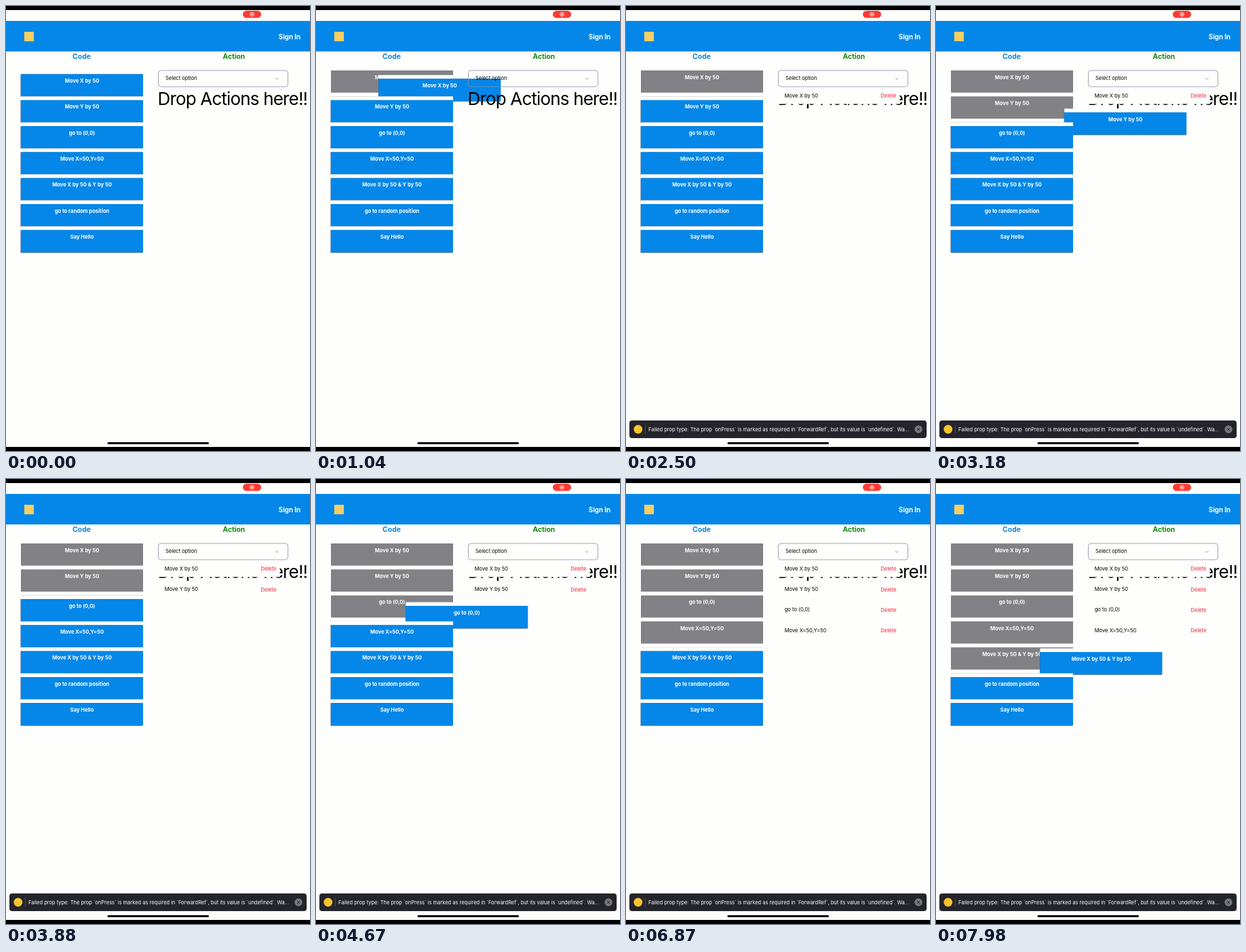
Recreate the animation shown at these times as an HTML page. Size 448x656 px, loop 8 s.

```html
<!DOCTYPE html>
<html lang="en">
<head>
<meta charset="utf-8">
<title>Drag and drop actions</title>
<style>
  html, body { margin: 0; width: 100%; height: 100%; overflow: hidden; background: #fefefd; }
  svg { display: block; width: 448px; height: 656px; }
  text { font-family: Inter, Roboto, sans-serif; font-size: 7.6px; font-optical-sizing: none; }
  .bold { font-weight: 700; }
  .mid { text-anchor: middle; }
  .white { fill: #fff; }
</style>
</head>
<body>
<svg viewBox="0 0 448 656">
  <rect width="448" height="656" fill="#fefefd"/>
  <g id="blocks"></g>

  <rect width="448" height="6"/>
  <rect y="650" width="448" height="6"/>
  <rect x="149.5" y="643" width="149.5" height="3" rx="1.5"/>
  <rect x="349" y="7" width="27" height="10.5" rx="5.2" fill="#fb3a34"/>
  <circle cx="362.5" cy="12.2" r="2.9" fill="none" stroke="#fff" stroke-width=".8"/>
  <circle cx="362.5" cy="12.2" r="1.3" fill="#fff"/>

  <rect y="22" width="448" height="45" fill="#0487e8"/>
  <rect x="27" y="38" width="14" height="14" fill="#f8cf62"/>
  <text class="bold white" x="434" y="48.5" text-anchor="end" style="font-size:9.7px">Sign In</text>
  <text class="bold mid" x="111.5" y="77.7" fill="#0a84dc" style="font-size:10.4px">Code</text>
  <text class="bold mid" x="335.8" y="77.7" fill="#0c8a0c" style="font-size:10.2px">Action</text>

  <rect x="224.5" y="95" width="191" height="24" rx="4" fill="none" stroke="#8c8ca4" stroke-width=".8"/>
  <text x="235" y="109.2" style="font-size:7.5px">Select option</text>
  <path d="M397 106l2.3 2.3 2.3-2.3" fill="none" stroke="#8a8a92" stroke-width=".8"/>
  <text x="223.5" y="146" style="font-size:26px;letter-spacing:-.032em">Drop Actions here!!</text>
  <g id="rows"></g>

  <g id="warning">
    <rect x="5" y="611" width="438" height="26" rx="4" fill="#24242b"/>
    <circle cx="17.8" cy="624" r="6.4" fill="#f8c52c"/>
    <path d="M28.5 617.5v13" stroke="#55555c" stroke-width=".8"/>
    <text class="white" x="33" y="626.7" style="font-size:7.5px">Failed prop type: The prop `onPress` is marked as required in `ForwardRef`, but its value is `undefined`. Wa...</text>
    <circle cx="431" cy="624" r="5.7" fill="#77777c"/>
    <path d="M429 622l4 4m0-4l-4 4" stroke="#222228" stroke-width="1"/>
  </g>
</svg>
<script>
const LOOP = 8000, PITCH = 38.3, WIDTH = 180, HEIGHT = 32.7, GAP = 5.5;

const labels = ['Move X by 50', 'Move Y by 50', 'go to (0,0)', 'Move X=50,Y=50',
  'Move X by 50 & Y by 50', 'go to random position', 'Say Hello'];

// Per dragged block: [time, dx, dy]; the block is dropped at the last time.
const drags = [
  [[920, 0, 0], [1040, 70, 6.7], [1250, 150, 26], [1640, 218, 43.7], [1850, 220, 45]],
  [[2820, 0, 0], [3180, 167, 18], [3420, 212, 25], [3650, 218, 28]],
  [[4480, 0, 0], [4670, 110, 10], [5000, 205, 6], [5200, 210, 4]],
  [[5930, 0, 0], [6010, 25, 1.5], [6400, 200, 0], [6700, 212, -5]],
  [[7780, 0, 0], [7980, 131, 1.5], [8100, 180, 3]]
];

const byId = id => document.getElementById(id);
const dropTime = path => path[path.length - 1][0];
const escape = text => text.replace('&', '&amp;');
const show = (element, visible) => element.style.display = visible ? '' : 'none';

function box(fill, label) {
  return `<rect width="${WIDTH}" height="${HEIGHT}" fill="${fill}"/>
    <text class="bold mid white" x="${WIDTH / 2}" y="12.7">${escape(label)}</text>`;
}

// Each slot is a gray box covered by a draggable blue box with a white margin
// and a thin dark edge at its left and bottom.
byId('blocks').innerHTML = labels.map((label, i) =>
  `<g transform="translate(22 ${95 + i * PITCH})">${box('#828286', label)}
    <g class="drag"><rect width="${WIDTH}" height="${PITCH}" fill="#fefefd"/>
      <g transform="translate(0 ${GAP})">
        <rect x="-.5" width="${WIDTH}" height="${HEIGHT + .8}" fill="#40658c"/>
        ${box('#0487e8', label)}</g></g></g>`).join('');

byId('rows').innerHTML = drags.map((_, i) =>
  `<g class="row" transform="translate(224 ${119.6 + i * 30.3})">
    <rect y=".3" width="179.5" height="24.6" fill="#fefefd"/>
    <text x="9.7" y="15">${escape(labels[i])}</text>
    <text x="151.3" y="15.8" fill="#e8263a">Delete</text></g>`).join('');

const blocks = document.querySelectorAll('.drag');
const rows = document.querySelectorAll('.row');

function position(path, time) {
  if (time <= path[0][0]) return [0, 0];
  const next = path.findIndex(point => point[0] > time);
  const [t0, x0, y0] = path[next - 1], [t1, x1, y1] = path[next];
  const k = (time - t0) / (t1 - t0);
  return [x0 + (x1 - x0) * k, y0 + (y1 - y0) * k];
}

function draw(now) {
  const time = now % LOOP;
  drags.forEach((path, i) => {
    const dropped = time >= dropTime(path);
    show(blocks[i], !dropped);
    show(rows[i], dropped);
    if (!dropped) blocks[i].setAttribute('transform', `translate(${position(path, time)})`);
  });
  show(byId('warning'), time >= dropTime(drags[0]));
}

const start = performance.now();
function tick() {
  draw(performance.now() - start);
  requestAnimationFrame(tick);
}
tick();
</script>
</body>
</html>
```
